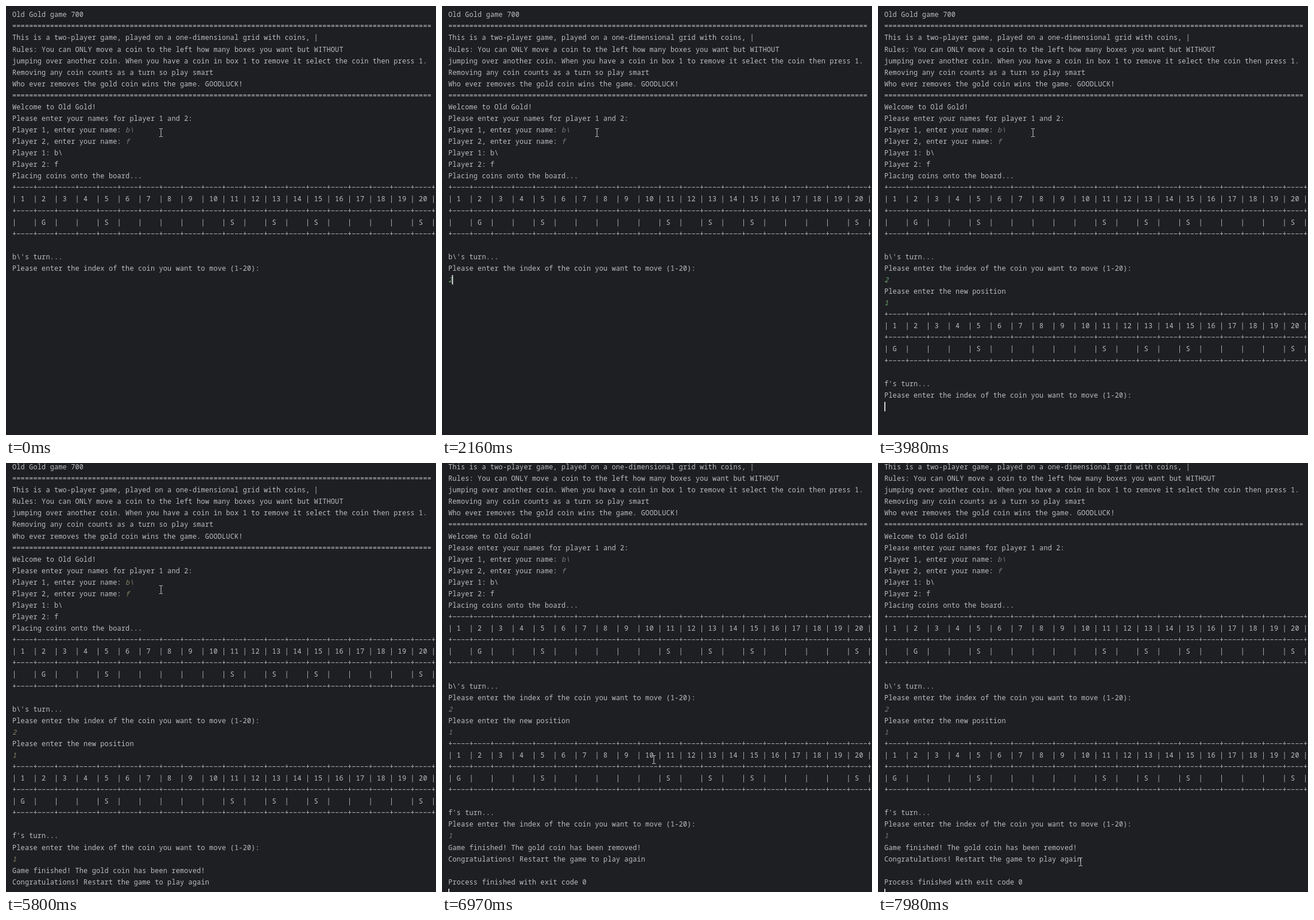
An HTML page with a canvas that plays this animation: 749 by 747 pixels, repeating every 8 s.

```html
<!DOCTYPE html>
<html lang="en">
<head>
<meta charset="utf-8">
<title>Coin game console</title>
<style>
  html, body { margin: 0; width: 100%; height: 100%; overflow: hidden; background: #1e1f22; }
  canvas { display: block; }
</style>
</head>
<body>
<canvas id="stage" width="749" height="747"></canvas>
<script>
const canvas = document.getElementById('stage');
const ctx = canvas.getContext('2d');
const LOOP = 8000, BLINK = 490, GAME_OVER = 5110, EXIT = 5860;

// The console is an 8 x 22 character grid, shown slightly reduced.
const ZOOM = 0.9125, CELL = 8, LINE = 22, VIEW = 805;
const LEFT = 11 / ZOOM, FIRST_CENTER = 15 / ZOOM, BASELINE = 4.7;
const FONT = '13px "Noto Sans Mono", "DejaVu Sans Mono", monospace';
const COLORS = {
  back: '#1e1f22', text: '#bcbec4', caret: '#e4e5e8', mouse: '#d4d4d4',
  typed: '#6aab73', fading: '#8a8468', old: '#7a7d80'
};

// Every console action adds lines and records where it leaves the caret.
const lines = [], carets = [];
const moveCaret = (time, row, column = 0) => carets.push({ time, row, column });

function print(time, ...texts) {
  texts.forEach(text => lines.push({ time, text, input: '' }));
  moveCaret(time, lines.length);
}

function type(time, input, prompt = '') {
  lines.push({ time, text: prompt, input });
  moveCaret(time, lines.length - 1, prompt.length + input.length);
}

const pressEnter = time => moveCaret(time, lines.length);

function printBoard(time, coins) {
  const numbers = Array.from({ length: 20 }, (_, i) => i + 1);
  const row = label => '|' + numbers.map(n => ' ' + String(label(n)).padEnd(3) + '|').join('');
  const rule = '+' + '\u2212\u2212\u2212\u2212+'.repeat(20);
  print(time, rule, row(n => n), rule, row(n => coins[n] || ''), rule, '');
}

const INTRO = 30 - 2 * BLINK;
const silver = { 5: 'S', 11: 'S', 13: 'S', 15: 'S', 20: 'S' };
const bar = '='.repeat(100);
const askCoin = 'Please enter the index of the coin you want to move (1-20):';

print(INTRO,
  'Old Gold game 700',
  bar,
  'This is a two-player game, played on a one-dimensional grid with coins, |',
  'Rules: You can ONLY move a coin to the left how many boxes you want but WITHOUT',
  'jumping over another coin. When you have a coin in box 1 to remove it select the coin then press 1.',
  'Removing any coin counts as a turn so play smart',
  'Who ever removes the gold coin wins the game. GOODLUCK!',
  bar,
  'Welcome to Old Gold!',
  'Please enter your names for player 1 and 2:');
type(INTRO, 'b\\', 'Player 1, enter your name: ');
type(INTRO, 'f', 'Player 2, enter your name: ');
print(INTRO, 'Player 1: b\\', 'Player 2: f', 'Placing coins onto the board...');
printBoard(INTRO, { ...silver, 2: 'G' });
print(INTRO, "b\\'s turn...", askCoin);
type(2160, '2');
pressEnter(2410);
print(2600, 'Please enter the new position');
type(3180, '1');
printBoard(3510, { ...silver, 1: 'G' });
print(3510, "f's turn...", askCoin);
type(4730, '1');
print(GAME_OVER, 'Game finished! The gold coin has been removed!',
  'Congratulations! Restart the game to play again');
print(EXIT, '', 'Process finished with exit code 0');

// The pointer makes three sweeps, each a curve pulled towards `via`.
const sweeps = [
  { start: 6375, end: 6590, from: [270, 220], via: [290, 145], to: [329, 328] },
  { start: 6690, end: 7150, from: [329, 328], via: [388, 480], to: [362, 637] },
  { start: 7250, end: 7980, from: [362, 637], via: [358, 668], to: [353, 694] }
];

function mouseAt(t) {
  const { start, end, from, via, to } = sweeps.findLast(s => s.start <= t) || sweeps[0];
  const k = Math.min(1, Math.max(0, (t - start) / (end - start)));
  return from.map((a, i) =>
    Math.round(a * (1 - k) ** 2 + via[i] * 2 * k * (1 - k) + to[i] * k * k));
}

function inputColor(line, t) {
  if (t >= EXIT) return COLORS.old;
  if (t >= GAME_OVER) return COLORS.fading;
  return line.time === INTRO ? COLORS.old : COLORS.typed;
}

function drawCells(text, column, y, color, style = '') {
  ctx.font = style + FONT;
  ctx.fillStyle = color;
  [...text].forEach((char, i) => {
    if (char !== ' ') ctx.fillText(char, LEFT + (column + i) * CELL, y);
  });
}

function drawMouse([x, y]) {
  ctx.fillStyle = COLORS.mouse;
  ctx.fillRect(x - 0.5, y - 6, 1, 13);
  for (const edge of [y - 7, y + 7]) {
    ctx.fillRect(x - 3, edge, 2.5, 1);
    ctx.fillRect(x + 0.5, edge, 2.5, 1);
  }
}

function draw(t) {
  ctx.setTransform(1, 0, 0, 1, 0, 0);
  ctx.fillStyle = COLORS.back;
  ctx.fillRect(0, 0, canvas.width, canvas.height);

  ctx.scale(ZOOM, ZOOM);
  const caret = carets.findLast(c => c.time <= t);
  const scroll = Math.max(0, caret.row * LINE - VIEW);
  const centerOf = row => FIRST_CENTER + row * LINE - scroll;

  lines.forEach((line, row) => {
    if (line.time > t) return;
    const y = centerOf(row) + BASELINE;
    drawCells(line.text, 0, y, COLORS.text);
    drawCells(line.input, line.text.length, y, inputColor(line, t), 'italic ');
  });

  if ((t - caret.time) % (2 * BLINK) < BLINK) {
    ctx.fillStyle = COLORS.caret;
    ctx.fillRect(LEFT + caret.column * 7, centerOf(caret.row) - 9, 2, 18);
  }

  ctx.setTransform(1, 0, 0, 1, 0, 0);
  drawMouse(mouseAt(t));
}

const start = performance.now();
function tick() {
  draw((performance.now() - start) % LOOP);
  requestAnimationFrame(tick);
}
tick();
</script>
</body>
</html>
```
